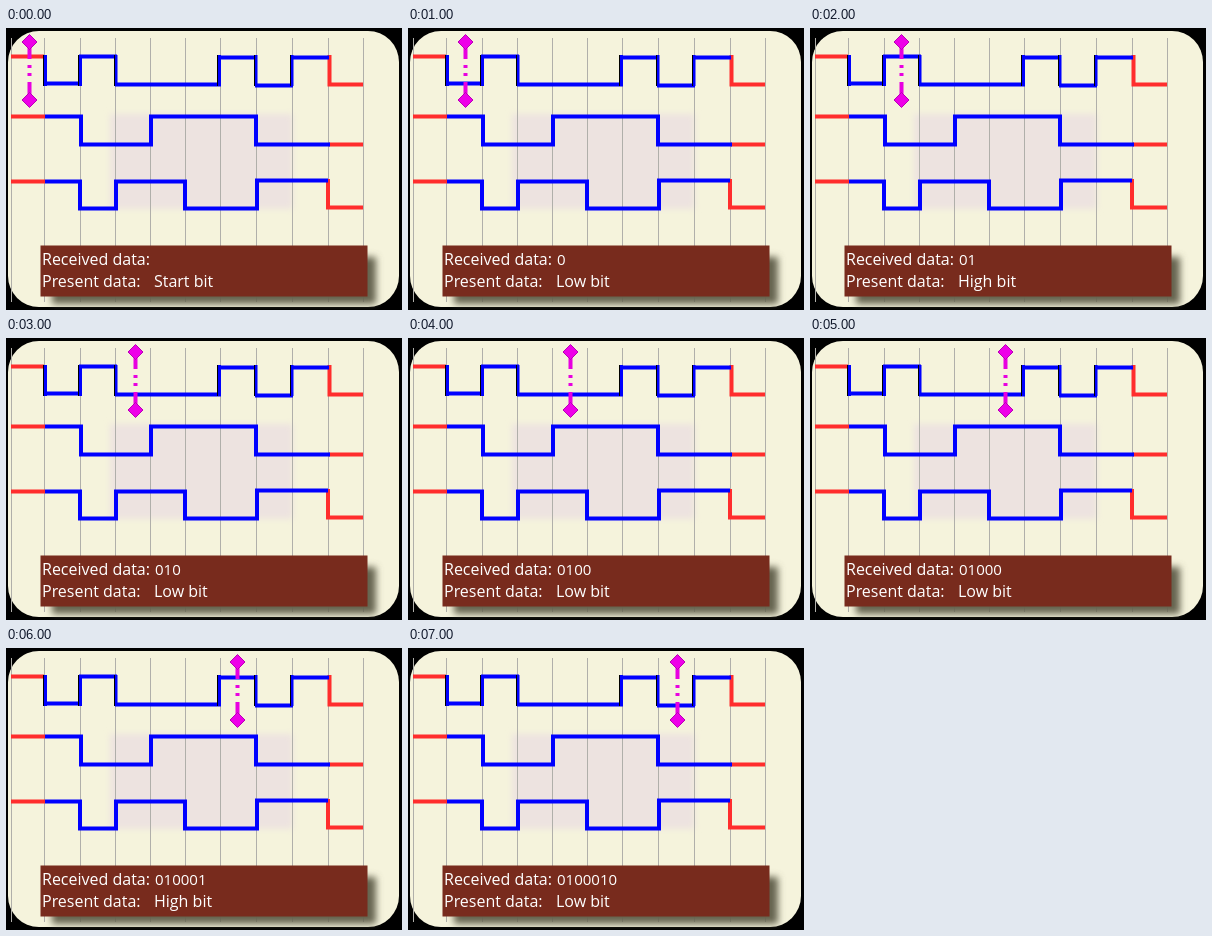
An HTML page that plays this animation: 396 by 282 pixels, repeating every 8000 ms.

```html
<!DOCTYPE html>
<html lang="en">
<head>
<meta charset="utf-8">
<title>Serial data sampling</title>
<style>
html, body { margin: 0; width: 100%; height: 100%; overflow: hidden; background: #000; }
svg { display: block; width: 396px; height: 282px; }
.wave { fill: none; stroke-width: 4; }
.on { stroke: #00f; }
.idle { stroke: #ff2d2d; }
text { font: 16px "Open Sans", "Noto Sans", sans-serif; fill: #fff; }
#bits { font-size: 15px; }
</style>
</head>
<body>
<svg viewBox="0 0 396 282">
  <defs>
    <filter id="soft" x="-10%" y="-30%" width="120%" height="160%"><feGaussianBlur stdDeviation="3.5"/></filter>
    <filter id="haze" x="-10%" y="-10%" width="120%" height="120%"><feGaussianBlur stdDeviation="3"/></filter>
  </defs>
  <rect width="396" height="282"/>
  <rect x="2" y="3" width="391" height="276" rx="31" fill="#f5f3dc"/>
  <rect x="104" y="86" width="183" height="95" fill="#ede3e0" filter="url(#haze)"/>
  <path id="grid" fill="none" stroke="#b0afaa"/>

  <g class="wave">
    <path class="idle" d="M5 28.5H38M323.5 27V56.5H357"/>
    <path class="on" d="M38 55.5H75M73 28.5H111M109 56.5H215M212 29.5H251M249 57.5H287M285 29.5H323"/>
    <path id="edges" class="on" stroke-width="3"/>
    <path id="trim" stroke="#000" stroke-width="1"/>

    <path class="idle" d="M5 88.5H39M323 116.5H357"/>
    <path class="on" d="M39 88.5H75V116.5H145V88.5H250V116.5H324"/>

    <path class="idle" d="M5 153.5H39M322 151V179.5H357"/>
    <path class="on" d="M39 153.5H74V180.5H110V153.5H179V180.5H251V152.5H322"/>
  </g>

  <rect x="46" y="229" width="324" height="47" fill="#65634f" filter="url(#soft)"/>
  <rect x="34.5" y="217.5" width="327" height="51" fill="#782b1d"/>
  <text x="36" y="237">Received data:</text>
  <text id="bits" x="149" y="237"></text>
  <text x="36" y="259">Present data:</text>
  <text id="state" x="148" y="259"></text>

  <g id="probe">
    <path d="M0 14V31M0 37V40M0 45V48M0 54V72" stroke="#e800e0" stroke-width="4"/>
    <path d="M0 6.5L7.5 14L0 21.5L-7.5 14ZM0 64.5L7.5 72L0 79.5L-7.5 72Z" fill="#ee00e8" stroke="#b800b4"/>
  </g>
</svg>
<script>
const $ = id => document.getElementById(id);
const lines = (xs, y1, y2) => xs.map(x => `M${x} ${y1}V${y2}`).join("");

$("grid").setAttribute("d", lines([5.5, 38.5, 74.5, 109.5, 144.5, 179.5, 214.5, 250.5, 286.5, 322.5, 357.5], 10, 274));
const edges = [39.5, 74.5, 110, 213.5, 250, 286];
$("edges").setAttribute("d", lines(edges, 27, 58));
$("trim").setAttribute("d", lines(edges.map(x => Math.floor(x) - 1.5), 27, 58));

const stepMs = 1000;
const data = "0100010";
const stops = [23.5, 57.5, 91.5, 129.5, 162.5, 195.5, 231.5, 269.5];
let shown = -1;

function draw(now) {
  const step = Math.floor(now / stepMs) % stops.length;
  if (step !== shown) {
    shown = step;
    $("probe").setAttribute("transform", `translate(${stops[step]} 0)`);
    $("bits").textContent = data.slice(0, step);
    $("state").textContent = step ? (data[step - 1] === "1" ? "High bit" : "Low bit") : "Start bit";
  }
  requestAnimationFrame(draw);
}
draw(performance.now());
</script>
</body>
</html>
```
